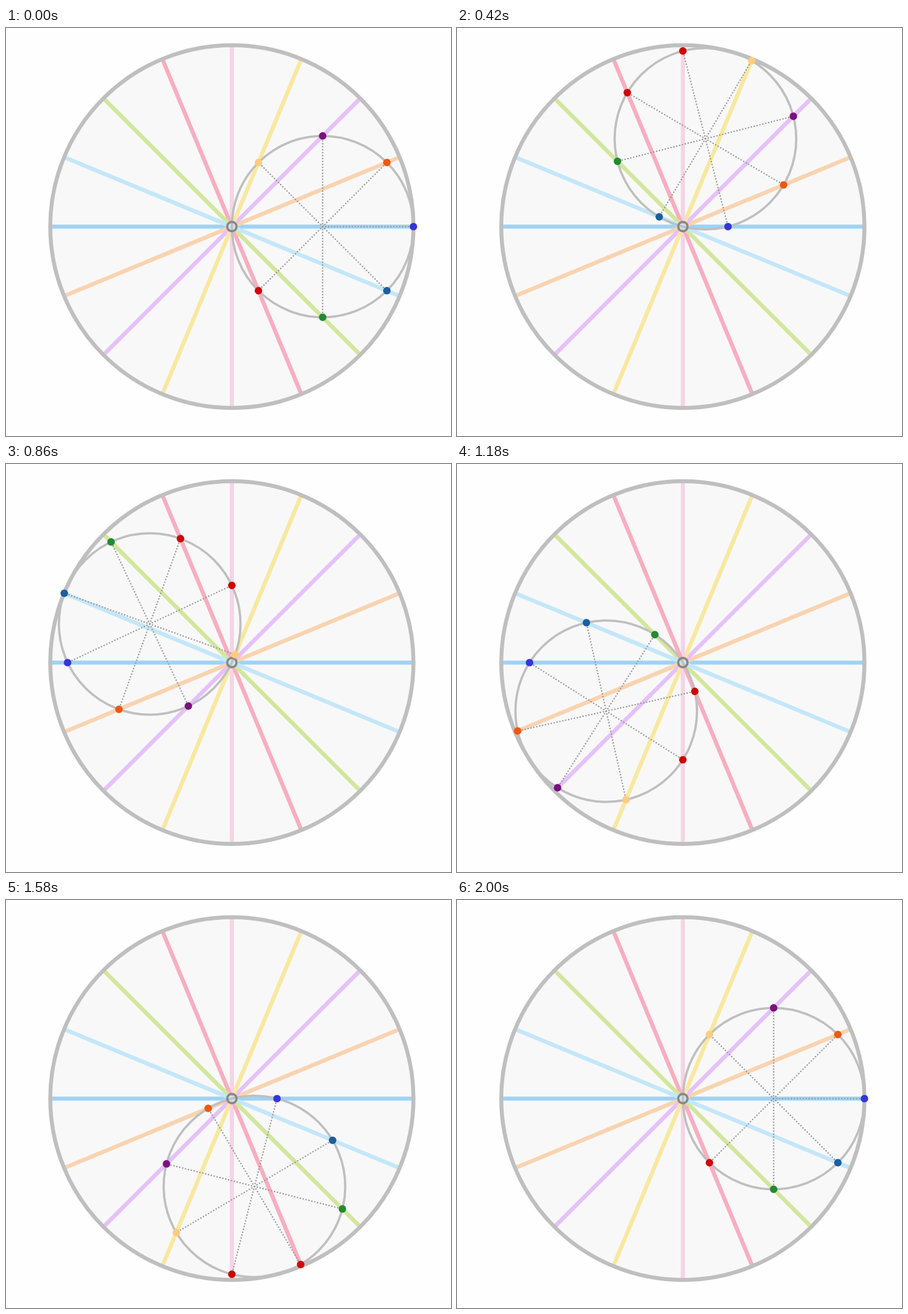
Recreate the animation shown at these times as an HTML page. Size 781 px wide and 717 px high, loop 2.02 s.

```html
<!DOCTYPE html>
<html lang="en">
<head>
<meta charset="utf-8">
<title>Circle rolling in a circle</title>
<style>
  html, body { margin: 0; width: 100%; height: 100%; overflow: hidden; background: #fefefe; }
  svg { display: block; }
  .tracks line { stroke-width: 7.2; }
  .radii line { stroke: #999; stroke-width: 2.7; stroke-linecap: round; stroke-dasharray: 0 5.2; }
</style>
</head>
<body>
<svg width="781" height="717" viewBox="0 0 781 717">
  <g id="stage" transform="translate(396.4 349)" fill="none">
    <circle r="318.7" fill="#f8f8f8"/>
    <g class="tracks"></g>
    <circle r="318.7" stroke="#bfbfbf" stroke-width="7"/>
    <circle id="roller" r="159.35" stroke="#bfbfbf" stroke-width="4"/>
    <circle r="8.2" stroke="#888" stroke-width="4"/>
    <g class="radii"></g>
    <g class="dots"></g>
  </g>
</svg>
<script>
  const R = 318.7, STEP = 20, LOOP = 2020, TURN = 2000;
  // One track per 22.5 degrees: line colour, dot colour
  const COLORS = [
    ["#9dd3f6", "#3636d8"],
    ["#f9d3b0", "#ee5812"],
    ["#e5c1f9", "#7a1180"],
    ["#f8e8a0", "#ffcc80"],
    ["#f5d4e6", "#cc0404"],
    ["#f7aec0", "#cc0a08"],
    ["#d2e79c", "#248a34"],
    ["#c3e7f9", "#1c5fa0"]
  ];

  const find = s => document.querySelector(s);
  const set = (el, attrs) => {
    for (const name in attrs) el.setAttribute(name, attrs[name]);
    return el;
  };
  const add = (parent, tag, attrs) =>
    find(parent).appendChild(set(document.createElementNS("http://www.w3.org/2000/svg", tag), attrs));

  const tracks = COLORS.map(([line, dot], i) => {
    const a = i * Math.PI / 8, x = Math.cos(a), y = -Math.sin(a);
    add(".tracks", "line", { x1: -R * x, y1: -R * y, x2: R * x, y2: R * y, stroke: line });
    return {
      a, x, y,
      radius: add(".radii", "line", {}),
      dot: add(".dots", "circle", { r: 6.6, fill: dot })
    };
  });
  const roller = find("#roller");

  function draw(ms) {
    const t = Math.floor(ms % LOOP / STEP) * STEP;
    const turn = t / TURN * 2 * Math.PI;
    const cx = R / 2 * Math.cos(turn), cy = -R / 2 * Math.sin(turn);
    set(roller, { cx, cy });
    for (const { a, x, y, radius, dot } of tracks) {
      const d = R * Math.cos(turn - a);
      // A dot exactly at the hub vanishes together with its radius
      const display = Math.abs(d) < 1e-6 ? "none" : "inline";
      set(radius, { x1: cx, y1: cy, x2: d * x, y2: d * y, display });
      set(dot, { cx: d * x, cy: d * y, display });
    }
  }

  const start = performance.now();
  function tick() {
    draw(performance.now() - start);
    requestAnimationFrame(tick);
  }
  draw(0);
  requestAnimationFrame(tick);
</script>
</body>
</html>
```
